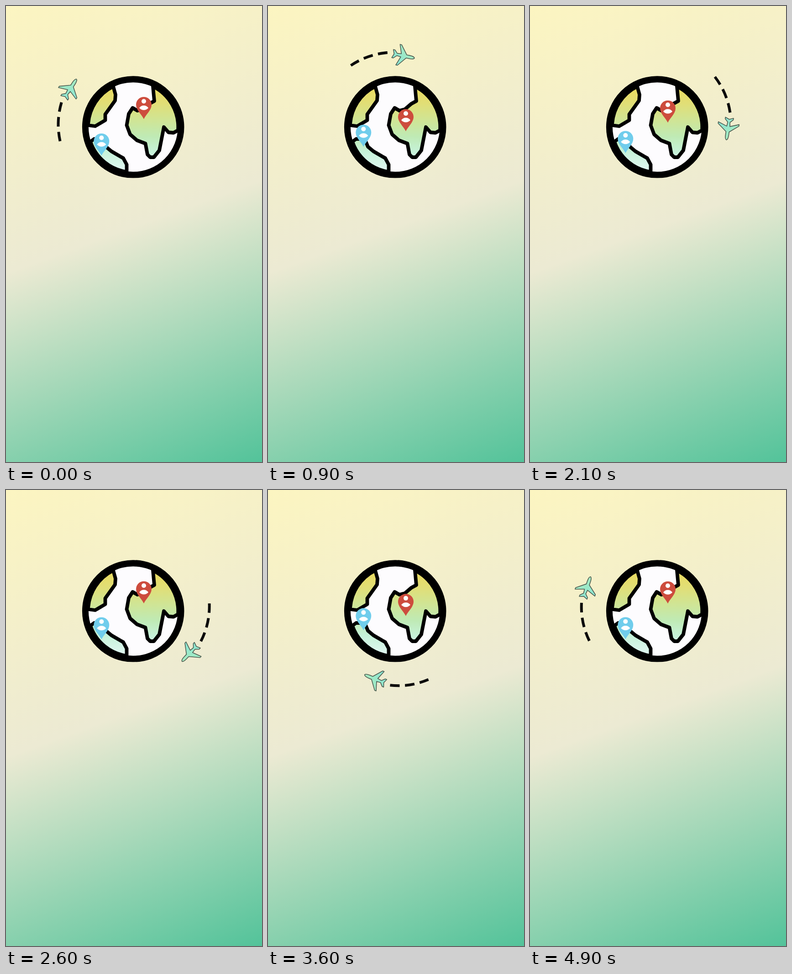
Write an HTML page that moves like this. It is 561 px wide and 998 px high and loops after 5 s.

```html
<!DOCTYPE html>
<html lang="en">
<head>
<meta charset="utf-8">
<title>Plane around the globe</title>
<style>
  html, body { margin: 0; width: 100%; height: 100%; overflow: hidden; }
  body { background: linear-gradient(160deg, #fcf5c1, #ecead3 48.6%, #53c39a); }
  svg { display: block; width: 100%; height: 100%; }
</style>
</head>
<body>
<svg viewBox="0 0 561 998" preserveAspectRatio="none">
  <defs>
    <linearGradient id="land" gradientUnits="userSpaceOnUse" x1="0" y1="175" x2="0" y2="365">
      <stop offset="0" stop-color="#ebda5c"/>
      <stop offset=".2" stop-color="#e1de76"/>
      <stop offset=".4" stop-color="#cfe596"/>
      <stop offset=".58" stop-color="#bfeab4"/>
      <stop offset=".76" stop-color="#c6f2d9"/>
      <stop offset="1" stop-color="#e4f8f5"/>
    </linearGradient>
    <linearGradient id="wing" x1="0" y1="0" x2="1" y2="1">
      <stop offset="0" stop-color="#b4ecb6"/>
      <stop offset=".5" stop-color="#9be9c9"/>
      <stop offset="1" stop-color="#84e4d8"/>
    </linearGradient>
    <clipPath id="base"><path d="M160 150H400V376.6H160Z"/></clipPath>
    <g id="pin">
      <path d="M0 48.5C-4 39-17 29-17 17A17 17 0 0 1 17 17C17 29 4 39 0 48.5Z"/>
      <circle cy="9.5" r="5" fill="#fff"/>
      <path d="M-10 24Q-6 18.8 0 18.8T10 24Q6 28.8 0 28.8T-10 24Z" fill="#fff"/>
    </g>
  </defs>

  <g clip-path="url(#base)" stroke="#000">
    <circle cx="278.7" cy="265" r="104.8" fill="#fdfcfe" stroke-width="14"/>
    <g fill="url(#land)" stroke-width="7.8" stroke-linejoin="round">
      <path d="M235 176L240 194L239 207L217.5 237V250L195.5 263L180 261A99 99 0 0 1 235 176Z"/>
      <path d="M185 297L193 291H212L219 308L231 318L257 333L264.5 347V363A99 99 0 0 1 185 297Z"/>
      <path d="M322 176L325 208L314 214L300 226L288 229L277.5 223L269 236L264.5 261L272 281L287 294L305.5 301L310 325L316 331H324L336 316L346 265L356 276.5L367 277.5L377 272A99 99 0 0 0 322 176Z"/>
    </g>
  </g>

  <use id="red" href="#pin" fill="#cd4c3d"/>
  <use id="blue" href="#pin" fill="#70cdec"/>

  <!-- trail chord lies on the x axis, plane ahead of it -->
  <g id="flight">
    <path d="M42.5 0Q0-11-42.5 0" fill="none" stroke="#0b0b0b" stroke-width="6" stroke-dasharray="21 11.7"/>
    <path transform="translate(73 18) rotate(121)" fill="url(#wing)" stroke="#4c5b50" stroke-width="1.6" stroke-linejoin="round"
      d="M0-25C2.5-24 3.5-19 3.5-14V-7L23 8.5V12L3.5 5L2.5 14L9 20.5V24L0 20.5L-9 24V20.5L-2.5 14L-3.5 5L-23 12V8.5L-3.5-7V-14C-3.5-19-2.5-24 0-25Z"/>
  </g>
</svg>
<script>
const $ = id => document.getElementById(id);
const LOOP = 5000, STEP = 100, BOB = 2500;

// [ms, bearing of the trail from the globe's centre, extra tilt], degrees
const orbit = [[0, -85.9, -2], [900, -21.1, 1.8], [1600, 28.8, 3.8], [2100, 63.7, 3.2],
  [3000, 127.3, 3.9], [4200, 210.6, 1.4], [4900, 261.4, -3]];
// [ms, phase]: the pins leave their end point faster than they return
const bob = [[0, 0], [500, 95], [900, 152], [1600, 237], [2100, 297], [2400, 338], [2500, 360]];

function at(keys, t, col = 1) {
  let i = 1;
  while (i < keys.length - 1 && keys[i][0] < t) i++;
  const a = keys[i - 1], b = keys[i];
  return a[col] + (b[col] - a[col]) * (t - a[0]) / (b[0] - a[0]);
}

function draw(now) {
  const t = Math.floor(now % LOOP / STEP) * STEP;
  const s = (1 - Math.cos(at(bob, t % BOB) * Math.PI / 180)) / 2;
  $('red').setAttribute('transform', `translate(302 ${199 + 28.4 * s})`);
  $('blue').setAttribute('transform', `translate(209.3 ${279 - 20.4 * s})`);
  $('flight').setAttribute('transform',
    `translate(279 264.7) rotate(${at(orbit, t)}) translate(0 -159.3) rotate(${at(orbit, t, 2)})`);
}

const start = performance.now();
function tick() {
  draw(performance.now() - start);
  requestAnimationFrame(tick);
}
tick();
</script>
</body>
</html>
```
